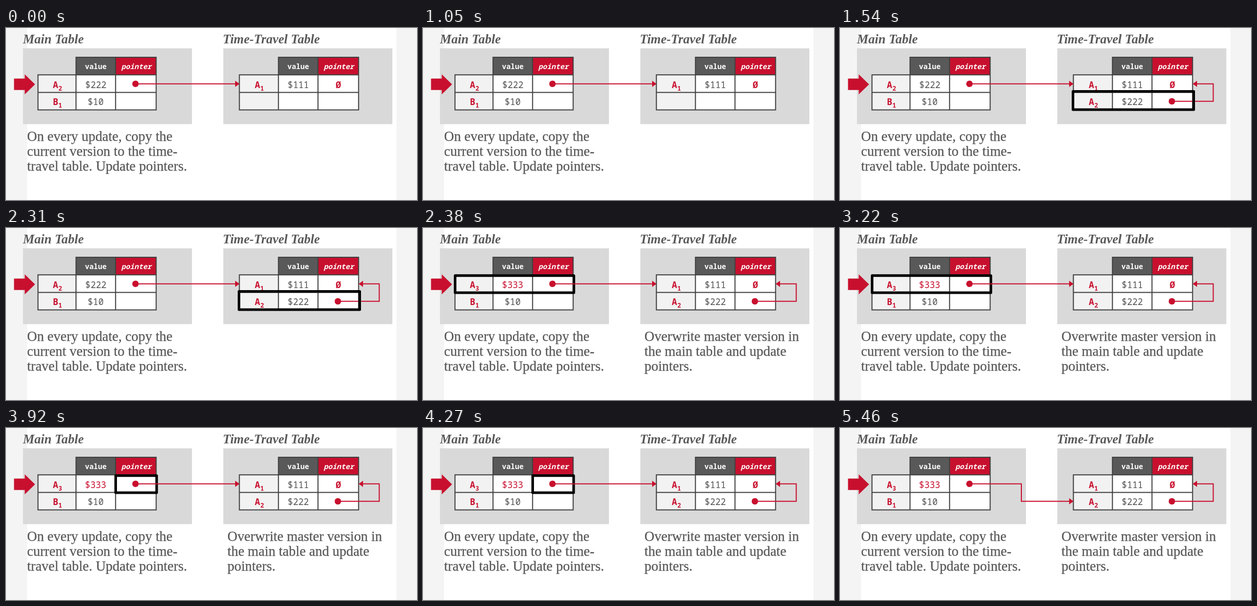
Animation, 800 px wide and 335 px high, one loop 5950 ms. Source, as an HTML page:

```html
<!DOCTYPE html>
<html lang="en">
<head>
<meta charset="utf-8">
<title>Time-travel version storage</title>
<style>
  html, body { margin: 0; width: 100%; height: 100%; overflow: hidden; background: #fff; }
  svg { display: block; width: 800px; height: 335px; }
  .title { font: italic bold 25.1px "Liberation Serif", serif; fill: #595959; }
  .note { font: 26.9px "Liberation Serif", serif; fill: #595959; stroke: #595959; stroke-width: .3; }
  .head { font: bold 14px "Noto Sans Mono", monospace; fill: #fff; text-anchor: middle; }
  .slant { font-style: italic; }
  .cell { font: 17.2px "Noto Sans Mono", monospace; fill: #505050; text-anchor: middle; }
  .key { font-weight: 600; fill: #c8102e; }
  .sub { font-size: 12px; }
  .red { fill: #c8102e; }
  .grid { fill: none; stroke: #404040; stroke-width: 2; }
  .line { fill: none; stroke: #c8102e; stroke-width: 2; }
  .box { fill: none; stroke: #000; stroke-width: 5; stroke-linejoin: round; }
</style>
</head>
<body>
<svg id="stage" viewBox="0 0 800 335"></svg>
<script>
const LOOP = 5950;
const ROW1 = 116.5, ROW2 = 150;

const rect = (x, y, r, b, attrs) =>
  `<rect x="${x}" y="${y}" width="${r - x}" height="${b - y}" ${attrs}/>`;
const text = (cls, x, y, s) => `<text class="${cls}" x="${x}" y="${y}">${s}</text>`;
const cell = (x, y, s, cls = "") => text("cell " + cls, x, y, s);
const sub = (x, y, n) => cell(x + 9, y + 5.3, n, "key sub");
const key = (x, y, letter, n) => cell(x, y, letter, "key") + sub(x, y, n);
const note = (x, lines) =>
  lines.map((s, i) => text("note", x, 219.7 + i * 29.2, s)).join("");
const box = (x, y, r, b) => rect(x, y, r, b, 'class="box"');

// Dot, connector and a triangular head ending at (x, y); dir is the travel direction.
const pointer = (dotX, dotY, path, x, y, dir) =>
  `<circle class="red" cx="${dotX}" cy="${dotY}" r="6.3"/>
   <path class="line" d="M${dotX} ${dotY}${path}H${x - 7 * dir}"/>
   <path class="red" d="M${x} ${y}l${-8.5 * dir} -6v12z"/>`;

function table(title, titleX, panelX, [a, b, c, d]) {
  return text("title", titleX, 30.4, title) +
    rect(panelX, 39.5, panelX + 329, 187.3, 'fill="#d9d9d9"') +
    rect(a, 91.3, b, 159.5, 'fill="#f2f2f2"') +
    rect(b, 91.3, d, 159.5, 'fill="#fff"') +
    rect(b, 57, c, 91.3, 'fill="#595959"') +
    rect(c, 57, d, 91.3, 'class="red"') +
    `<path class="grid" d="M${b} 57H${d}V159.5H${a}V91.3H${d}M${a} 125.5H${d}M${b} 56V159.5M${c} 57V159.5"/>` +
    text("head", (b + c) / 2, 80, "value") +
    text("head slant", (c + d) / 2 + 1, 80, "pointer");
}

// Parts shown only from one moment (ms) to another.
const parts = [];
function during(from, to, content) {
  parts.push({ from, to });
  return `<g class="part">${content}</g>`;
}

const COPY = 1400, OVERWRITE = 2380, FOCUS = 3920, RELINK = 5180;

stage.innerHTML =
  rect(0, 0, 41, 335, 'fill="#f4f4f4"') +
  rect(760, 0, 800, 335, 'fill="#f4f4f4"') +
  table("Main Table", 33, 33, [62.3, 136.3, 213.3, 292.3]) +
  table("Time-Travel Table", 422, 423, [454.3, 530.3, 607.3, 686.3]) +
  '<path class="red" d="M15.6 98.6H36.5V90.2L56.5 109.7L36.5 129.2V120.8H15.6z"/>' +
  cell(96.5, ROW1, "A", "key") +
  key(96.5, ROW2, "B", 1) + cell(174.5, ROW2, "$10") +
  key(489.5, ROW1, "A", 1) + cell(569, ROW1, "$111") + cell(647, ROW1, "Ø", "key") +
  note(41, ["On every update, copy the", "current version to the time-", "travel table. Update pointers."]) +
  during(0, OVERWRITE, sub(96.5, ROW1, 2) + cell(175, ROW1, "$222")) +
  during(OVERWRITE, LOOP, sub(96.5, ROW1, 3) + cell(174.5, ROW1, "$333", "red") +
    note(431, ["Overwrite master version in", "the main table and update", "pointers."])) +
  during(COPY, LOOP, key(489.5, ROW2, "A", 2) + cell(569, ROW2, "$222") +
    pointer(646, 142.7, "H726.5V108.7", 686.5, 108.7, -1)) +
  during(COPY, OVERWRITE, box(453.5, 123.5, 688.5, 158.9)) +
  during(OVERWRITE, FOCUS, box(62.5, 92.7, 293.7, 125.9)) +
  during(FOCUS, RELINK, box(213.5, 92.7, 293.2, 125.9)) +
  during(0, RELINK, pointer(252, 108.7, "", 454.5, 108.7, 1)) +
  during(RELINK, LOOP, pointer(252, 108.7, "H353V142.7", 454.5, 142.7, 1));

const groups = document.querySelectorAll(".part");

function draw() {
  const t = performance.now() % LOOP;
  parts.forEach(({ from, to }, i) => {
    groups[i].style.display = t >= from && t < to ? "" : "none";
  });
  requestAnimationFrame(draw);
}
draw();
</script>
</body>
</html>
```
